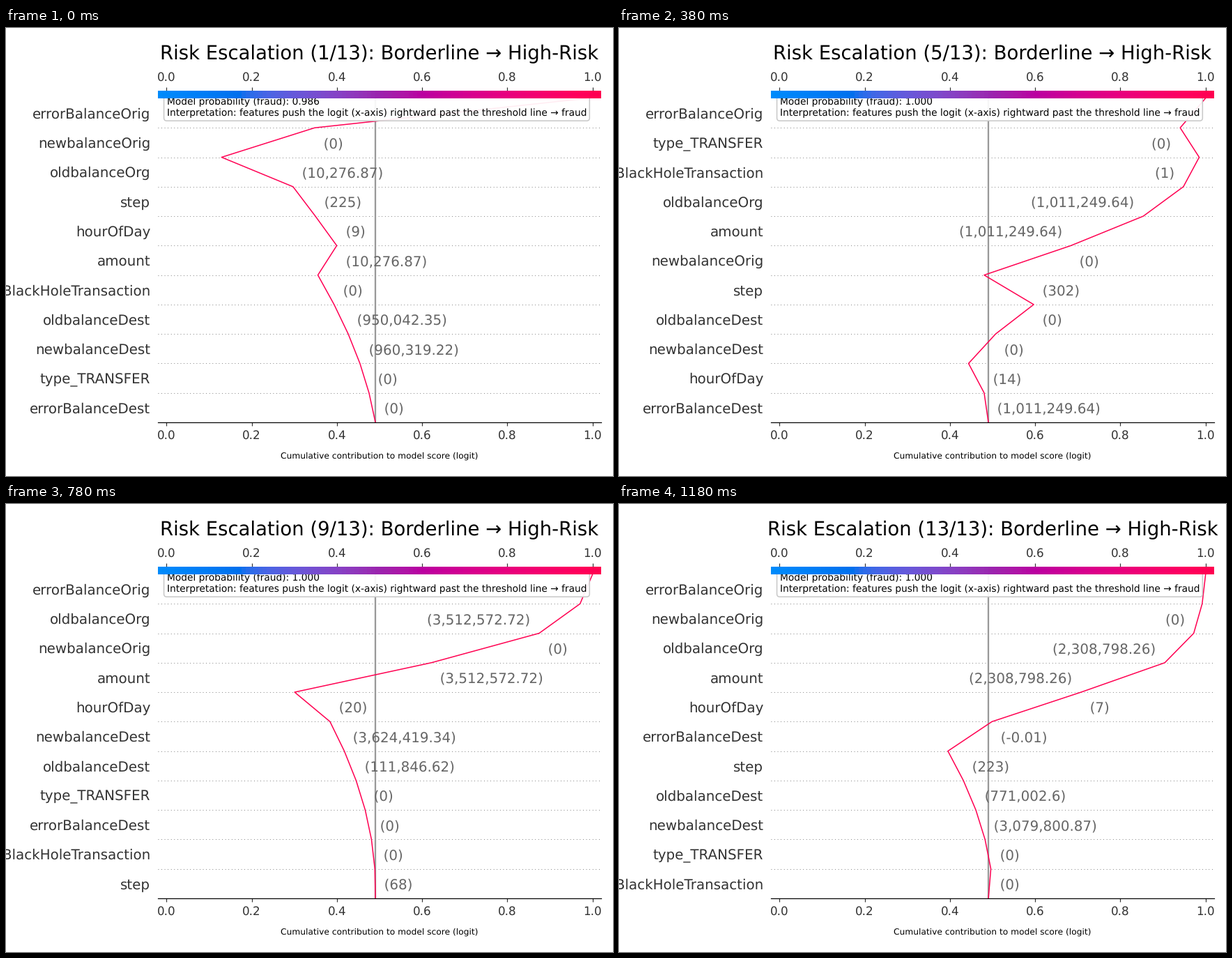
Animation of 871x643 px, one loop 1490 ms. Source, as a matplotlib script:

```python
import matplotlib.pyplot as plt
import numpy as np
from matplotlib.animation import FuncAnimation

plt.rcParams["text.hinting"] = "no_hinting"

W, H, DPI = 871, 643, 110
LEFT, RIGHT, TOP, BOTTOM = 218, 854, 90.4, 566
TICK, LOOP = 10, 1490
STEPS, ROWS = 13, 11
BASE, LEAD = 0.4903, 4.9  # threshold score, logit share of the top feature
GREY = "#333333"

NAMES = dict(eo="errorBalanceOrig", no="newbalanceOrig", oo="oldbalanceOrg",
             st="step", hr="hourOfDay", am="amount", bh="isBlackHoleTransaction",
             od="oldbalanceDest", nd="newbalanceDest", tt="type_TRANSFER",
             ed="errorBalanceDest")
CASES = {}


def case(k, step, amount, dest, order, sizes, slip=0):
    """Features run bottom row up, "-" lowers the score.

    sizes gives the logit share at key rows; rows between are interpolated.
    """
    names = order.split()
    sign = np.array([-1 if n[0] == "-" else 1 for n in names])
    size = np.interp(range(1, ROWS + 1), list(sizes) + [ROWS],
                     list(sizes.values()) + [LEAD])
    logit = np.log(BASE / (1 - BASE)) + np.append(0, np.cumsum(sign * size))
    CASES[k] = dict(step=step, amount=amount, dest=dest, slip=slip,
                    order=[n.strip("-") for n in names],
                    path=1 / (1 + np.exp(-logit)))


case(1, 225, 10276.87, 950042.35,
     "-ed -tt -nd -od -bh am -hr -st -oo no eo",
     {1: .06, 8: .24, 9: 1.045, 10: 1.278})
case(3, 516, 346293.24, 0,
     "st -hr nd -ed am od oo no bh -tt eo",
     {1: .053, 6: .37, 7: .9, 10: 1.4})
case(5, 302, 1011249.64, 0,
     "-ed -hr nd od -st no am oo bh -tt eo",
     {1: .04, 5: .47, 6: .85, 10: 1.42})
case(7, 665, 454483.23, 0,
     "hr st -ed nd od am oo no -tt bh eo",
     {1: .003, 6: .47, 7: .9, 10: 1.4})
case(9, 68, 3512572.72, 111846.62,
     "-st -bh -ed -tt -od -nd -hr am no oo eo",
     {1: .005, 6: .14, 7: .37, 8: 1.34, 10: 1.55})
case(10, 444, 1186725.39, 571163.84,
     "bh -tt st -ed -hr -od -nd am no oo eo",
     {1: .005, 2: .065, 7: .133, 8: 1.12, 10: 1.53})
case(13, 223, 2308798.26, 771002.6,
     "bh -tt -nd -od -st ed hr am oo no eo",
     {1: .023, 5: .15, 6: .42, 8: 1.36, 10: 1.25}, slip=.01)


def blend(k):
    """Case k, or a mix of its two neighbours."""
    if k in CASES:
        return CASES[k]
    lo = max(n for n in CASES if n < k)
    hi = min(n for n in CASES if n > k)
    a, b, w = CASES[lo], CASES[hi], (k - lo) / (hi - lo)
    near = a if w < .5 else b
    mixed = {key: a[key] + (b[key] - a[key]) * w
             for key in ("step", "amount", "dest", "path")}
    mixed["step"] = round(mixed["step"])
    if not near["dest"]:
        mixed["dest"] = 0
    return {**near, **mixed}


def values(c):
    """Feature values of one transfer that empties the sender's account."""
    amount, dest, slip = c["amount"], c["dest"], c["slip"]
    hole = dest == 0
    v = dict.fromkeys(NAMES, 0)
    v.update(st=c["step"], hr=c["step"] % 24, am=amount, oo=amount, od=dest,
             bh=int(hole), nd=0 if hole else dest + amount + slip,
             ed=amount if hole else 0 - slip)
    return v


def blue_red(t):
    """Blue to red through purple, along hue in Lab space."""
    light = 40 + 14 * abs(2 * t - 1)
    chroma = 70 + 20 * t
    hue = 4.6588 + (0.3547 + 2 * np.pi - 4.6588) * t
    fy = (light + 16) / 116
    f = np.array([fy + chroma * np.cos(hue) / 500, fy,
                  fy - chroma * np.sin(hue) / 200])
    xyz = np.where(f > 6 / 29, f ** 3, (f - 4 / 29) * 0.12842)
    xyz = xyz * [0.9505, 1, 1.089]
    lin = np.array([[3.2406, -1.5372, -0.4986],
                    [-0.9689, 1.8758, 0.0415],
                    [0.0557, -0.2040, 1.0570]]) @ xyz
    lin = np.clip(lin, 0, 1)
    rgb = np.where(lin > .0031308, 1.055 * lin ** (1 / 2.4) - .055, 12.92 * lin)
    return tuple(np.clip(rgb, 0, 1))


def number(v):
    return "(" + f"{v:,.2f}".rstrip("0").rstrip(".") + ")"


fig = plt.figure(figsize=((W + .01) / DPI, (H + .01) / DPI), dpi=DPI,
                 facecolor="white")
ax = fig.add_axes([LEFT / W, 1 - BOTTOM / H, (RIGHT - LEFT) / W,
                   (BOTTOM - TOP) / H])
ax.spines[["left", "right", "top"]].set_visible(False)

for y in range(1, ROWS):
    ax.axhline(y, color=GREY, lw=.5, dashes=(1, 5), zorder=-1)
ax.axvline(BASE, color="#999999", zorder=-1)

# Colour strip
shades = np.linspace(0, 1, 106)
strip = 1.04 / len(shades)
ax.bar(-.02 + strip * np.arange(len(shades)), .25, strip, bottom=ROWS,
       align="edge", lw=0, antialiased=False, zorder=6,
       color=[blue_red(t) for t in shades])

ax.set(xlim=(-.02, 1.02), ylim=(0, ROWS + .25))
ax.set_xticks(np.linspace(0, 1, 6))
ax.set_yticks(np.arange(ROWS) + .5)
ax.tick_params(axis="x", top=True, labeltop=True, labelsize=11,
               color=GREY, labelcolor=GREY)
ax.tick_params(axis="y", left=False, labelsize=13, labelcolor=GREY)

mid = (LEFT + RIGHT) / 2 / W
title = fig.text(mid, 1 - 45 / H, "", fontsize=18, ha="center")
fig.text(mid, 1 - 617 / H, "Cumulative contribution to model score (logit)",
         fontsize=8, ha="center")

line, = ax.plot([], [], lw=1)
labels = [ax.text(0, row + .5, "", fontsize=13, color="#666666",
                  va="center_baseline") for row in range(ROWS - 1)]
note = ax.text(.02, .98, "", transform=ax.transAxes, fontsize=9, va="top",
               bbox=dict(boxstyle="round,pad=0.3", fc="white", ec="#c4c4c4",
                         alpha=.93))


def place(label, text, a, b):
    """Right of the line, or left of it when there is no room."""
    label.set(text="  " + text, x=max(a, b), ha="left")
    if label.get_window_extent().x1 > RIGHT + 2:
        label.set(text=text + "  ", x=min(a, b), ha="right")


def update(i):
    t = i * TICK
    k = 1 if t < 80 else min(STEPS, 2 + (t - 80) // 100)
    c = blend(k)
    xs, vals = c["path"], values(c)
    line.set_data(xs, np.arange(ROWS + 1))
    line.set_color(blue_red(xs[-1]))
    title.set_text(f"Risk Escalation ({k}/{STEPS}): Borderline → High-Risk")
    note.set_text(f"Model probability (fraud): {xs[-1]:.3f}\n"
                  "Interpretation: features push the logit (x-axis) "
                  "rightward past the threshold line → fraud")
    ax.set_yticklabels([NAMES[n] for n in c["order"]])
    for row, label in enumerate(labels):
        place(label, number(vals[c["order"][row]]), xs[row], xs[row + 1])
    return []


anim = FuncAnimation(fig, update, frames=LOOP // TICK, interval=TICK,
                     repeat=True, repeat_delay=0)
plt.show()
```
